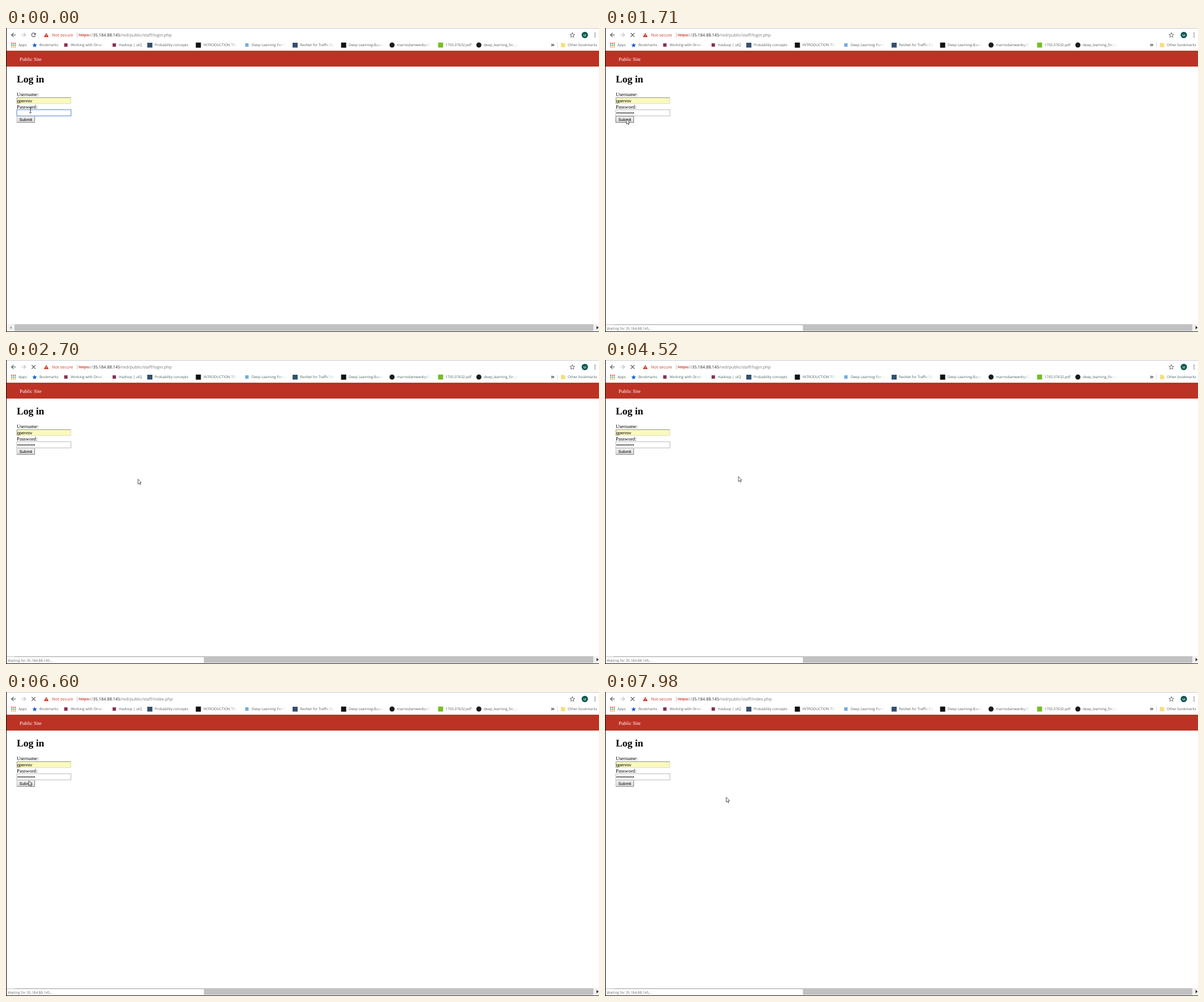
Recreate the animation shown at these times as an HTML page. Size 1045 px wide and 536 px high, loop 8000 ms.

```html
<!DOCTYPE html>
<html lang="en">
<head>
<meta charset="utf-8">
<title>Log in</title>
<style>
html, body { margin: 0; width: 100%; height: 100%; overflow: hidden; background: #fff; }
svg { display: block; width: 100vw; height: 100vh; }
text { text-rendering: geometricPrecision; white-space: pre; }
.ui { font-family: "Open Sans", "Noto Sans", sans-serif; }
.bar { font-size: 7.38px; }
.marks { font-size: 6.3px; fill: #55585c; }
.page { font: 8.9px "Liberation Serif", "Times New Roman", serif; }
.form { font: 7.26px "Liberation Sans", Arial, sans-serif; }
.line { fill: none; stroke: #4a4d51; stroke-width: 1.1; }

/* one shared 8 s clock, hard cuts only */
.t { animation: 8s step-end infinite; }
.typed { animation-name: typed; }
.focus { animation-name: focus; }
.blur, .stop { animation-name: blur; }
.reload { animation-name: focus; }
.hover { animation-name: hover; }
.status { animation-name: status; }
.host { animation-name: host; }
.cache { animation-name: cache; }
.login { animation-name: login; }
.index { animation-name: index; }
.beam { animation-name: beam; }
.arrow { animation-name: arrow; }

@keyframes typed { 0% { opacity: 0 } 7.375%, 100% { opacity: 1 } }
@keyframes focus { 0% { opacity: 1 } 16.25%, 100% { opacity: 0 } }
@keyframes blur { 0% { opacity: 0 } 16.25%, 100% { opacity: 1 } }
@keyframes hover { 0% { opacity: 0 } 12.875% { opacity: 1 } 32%, 100% { opacity: 0 } }
@keyframes status { 0% { opacity: 0 } 21.375%, 100% { opacity: 1 } }
@keyframes host { 0% { opacity: 1 } 73.875% { opacity: 0 } 77.25%, 100% { opacity: 1 } }
@keyframes cache { 0% { opacity: 0 } 73.875% { opacity: 1 } 77.25%, 100% { opacity: 0 } }
@keyframes login { 0% { opacity: 1 } 72.125%, 100% { opacity: 0 } }
@keyframes index { 0% { opacity: 0 } 72.125%, 100% { opacity: 1 } }
@keyframes beam {
  0% { transform: translate(43px, 145px); opacity: 1 }
  7.375% { transform: translate(43px, 148px); opacity: 1 }
  11%, 100% { transform: translate(43px, 148px); opacity: 0 }
}
@keyframes arrow {
  0% { transform: translate(37px, 162px); opacity: 0 }
  11% { transform: translate(37px, 162px); opacity: 1 }
  12.875% { transform: translate(36.5px, 161px) }
  14.625% { transform: translate(36.3px, 160.2px) }
  18% { transform: translate(36.6px, 160.2px) }
  19.5% { transform: translate(37px, 160.2px) }
  22.875% { transform: translate(37.5px, 159.7px) }
  30% { transform: translate(40.5px, 159.5px) }
  32% { transform: translate(192px, 205px) }
  33.75% { transform: translate(232px, 209.5px) }
  39.125% { transform: translate(233px, 208.5px) }
  41% { transform: translate(234px, 207px) }
  42.875% { transform: translate(234.3px, 206px) }
  53% { transform: translate(234.3px, 205.4px) }
  56.5% { transform: translate(234.5px, 205px) }
  73.875% { transform: translate(228px, 202px) }
  75.375% { transform: translate(200px, 197px) }
  77.25% { transform: translate(71px, 162px) }
  79.125% { transform: translate(40px, 157px) }
  82.5% { transform: translate(39.5px, 156px) }
  86% { transform: translate(40px, 156.4px) }
  87.875% { transform: translate(60px, 161px) }
  89.75% { transform: translate(165px, 182px) }
  91.25% { transform: translate(223px, 190px) }
  96.625% { transform: translate(219px, 192.5px) }
  98.25% { transform: translate(215px, 188px) }
  99.75%, 100% { transform: translate(213px, 185px); opacity: 1 }
}
</style>
</head>
<body>
<svg viewBox="0 0 1045 536" preserveAspectRatio="none">
  <defs>
    <linearGradient id="fadeOut">
      <stop offset="0" stop-color="#fff" stop-opacity="0"/>
      <stop offset=".62" stop-color="#fff"/>
    </linearGradient>
    <linearGradient id="face" x2="0" y2="1">
      <stop offset="0" stop-color="#f3f3f3"/>
      <stop offset="1" stop-color="#d9d9d9"/>
    </linearGradient>
    <rect id="fade" x="46" y="24" width="24" height="12" fill="url(#fadeOut)"/>
    <path id="star" d="M0-4.4 1.2-1.4 4.3-1.3 1.9.7 2.7 3.8 0 2.1-2.7 3.8-1.9.7-4.3-1.3-1.2-1.4Z"/>
  </defs>
  <rect width="1045" height="536" fill="#fff"/>

  <!-- address bar -->
  <g class="ui bar">
    <path class="line" d="M17.3 12.3H9.8M13.3 8.7 9.7 12.3 13.3 15.9"/>
    <path class="line" style="stroke:#babcbe" d="M27 12.3H34.5M31 8.7 34.6 12.3 31 15.9"/>
    <g class="t reload">
      <path class="line" d="M51.3 10A3.4 3.4 0 1 0 51.9 13.2"/>
      <path d="M52.5 8.4V12H48.9Z" fill="#4a4d51"/>
    </g>
    <path class="line t stop" d="M45.3 8.9 52 15.6M52 8.9 45.3 15.6"/>
    <path d="M71 8.4 75.2 16H66.8Z" fill="#d5301f"/>
    <path d="M71 11V13.4M71 14.1V15" stroke="#fff" stroke-width=".9"/>
    <text x="81" y="15" fill="#d0402f">Not secure</text>
    <path d="M125.5 8V17" stroke="#aaa" stroke-width=".7"/>
    <text x="128" y="15" fill="#d0402f">https<tspan fill="#777">://</tspan><tspan fill="#2b2b2b">35.184.88.145</tspan></text>
    <path d="M128 12.7H147.5" stroke="#d0402f" stroke-width=".7"/>
    <g fill="#777">
      <text class="t login" x="201.3" y="15">/red/public/staff/login.php</text>
      <text class="t index" x="201.3" y="15">/red/public/staff/index.php</text>
    </g>
    <use href="#star" x="998" y="12.5" fill="none" stroke="#4a4d51" stroke-width=".8"/>
    <circle cx="1020" cy="12.3" r="5.6" fill="#0b584c"/>
    <text x="1020" y="14.5" font-size="6" fill="#fff" text-anchor="middle">M</text>
    <path d="M1038 9.2V15.8" stroke="#4a4d51" stroke-width="1.7" stroke-linecap="round" stroke-dasharray="0 3.2"/>
  </g>

  <!-- bookmarks -->
  <g class="ui marks">
    <g stroke-width="2" stroke-dasharray="2 1.2">
      <path d="M9 27H17.4" stroke="#df5145"/>
      <path d="M9 30.2H17.4" stroke="#3f9b5c"/>
      <path d="M9 33.4H17.4" stroke="#e6ae32"/>
    </g>
    <text x="22" y="32.3">Apps</text>
    <use href="#star" x="50.5" y="30.3" fill="#1d5fd0"/>
    <text x="59" y="32.3">Bookmarks</text>
    <rect x="102.5" y="27" width="6" height="6" fill="#8c2f58"/>
    <text x="114" y="32.3">Working with Orvel |</text>
    <rect x="187.8" y="27" width="6" height="6" fill="#8c2f58"/>
    <text x="199" y="32.3">Hadoop | ulQ</text>
    <rect x="249" y="26" width="9" height="8.5" fill="#34506f"/>
    <text x="262" y="32.3">Probability concepts</text>
    <rect x="334.5" y="25.7" width="9" height="9" fill="#111"/>
    <text x="348" y="32.3">INTRODUCTION TO C</text>
    <rect x="421.5" y="27" width="6" height="6" fill="#78a9dc"/>
    <text x="433" y="32.3">Deep Learning For Co</text>
    <rect x="505" y="26" width="9" height="8.5" fill="#34506f"/>
    <text x="518" y="32.3">ResNet for Traffic Sign</text>
    <rect x="590.5" y="25.7" width="9" height="9" fill="#111"/>
    <text x="604" y="32.3">Deep Learning-Based</text>
    <circle cx="680.3" cy="30" r="4.5" fill="#1b1b1b"/>
    <text x="689" y="32.3">marnodamwenby/Cal</text>
    <rect x="761.5" y="25.7" width="8.8" height="8.8" fill="#76bd22"/>
    <text x="774.5" y="32.3">1705.07632.pdf</text>
    <circle cx="833.3" cy="30" r="4.5" fill="#1b1b1b"/>
    <text x="842" y="32.3">deep_learning_for_ca</text>
    <use href="#fade" x="114"/><use href="#fade" x="348"/><use href="#fade" x="433"/>
    <use href="#fade" x="518"/><use href="#fade" x="604"/><use href="#fade" x="689"/>
    <use href="#fade" x="842"/>
    <path class="line" stroke-width=".9" d="M961 28 963 30 961 32M963.6 28 965.6 30 963.6 32"/>
    <path d="M971.5 25V35" stroke="#ccc" stroke-width=".6"/>
    <path d="M978 26H981.5L982.3 27H985.5V34H978Z" fill="#f9dc7e"/>
    <text x="990" y="32.3">Other bookmarks</text>
  </g>

  <!-- page -->
  <rect y="40" width="1045" height="28" fill="#bc3224"/>
  <g class="page">
    <text x="24" y="57.5" fill="#fff">Public Site</text>
    <text x="19" y="96" font-size="17.6" font-weight="bold">Log in</text>
    <text x="19" y="120">Username:</text>
    <text x="19" y="141.7">Password:</text>
  </g>
  <g class="form">
    <rect x="19" y="122.5" width="95.5" height="11" fill="#fafabd"/>
    <path d="M19.3 133.5V122.8H114.5" fill="none" stroke="#858585" stroke-width=".9"/>
    <path d="M114.2 123V133.2H19.5" fill="none" stroke="#d2d2c4" stroke-width=".7"/>
    <text x="20" y="130.5">gpenrov</text>
    <rect class="t focus" x="19" y="144" width="95.6" height="11" fill="#fff" stroke="#4a80d0"/>
    <rect class="t blur" x="19" y="144" width="95.4" height="11" fill="#fff" stroke="#b0b0b0" stroke-width=".9"/>
    <path class="t typed" d="M21.3 149.8H50.5" stroke="#000" stroke-width="1.9" stroke-linecap="round" stroke-dasharray="0 2.62"/>
    <rect x="19" y="155.8" width="31.6" height="10.8" fill="url(#face)" stroke="#b4b4b4" stroke-width=".7"/>
    <path d="M50.6 156V166.6H19" fill="none" stroke="#777" stroke-width=".8"/>
    <rect class="t hover" x="19" y="155.8" width="31.6" height="10.8" fill="none" stroke="#7c7c7c" stroke-width=".8"/>
    <text x="34.8" y="163.7" text-anchor="middle">Submit</text>
  </g>

  <!-- scrollbar and status bubble -->
  <rect y="522" width="1045" height="13" fill="#f1f1f1"/>
  <rect x="15" y="522.3" width="1020" height="11.9" fill="#c1c1c1"/>
  <path d="M10 525.5V531L6.8 528.2Z" fill="#a0a0a0"/>
  <path d="M1040.7 525.3V531.2L1044.2 528.2Z" fill="#222"/>
  <g class="ui t status" font-size="6.22" fill="#6a6a6a">
    <path d="M0 523.4H347Q349.2 523.4 349.2 525.6V535H0Z" fill="#fff" stroke="#b5b5b5" stroke-width=".7"/>
    <text x="3" y="532">Waiting for </text>
    <text class="t host" x="36.5" y="532">35.184.88.145...</text>
    <text class="t cache" x="36.5" y="532">cache...</text>
  </g>

  <!-- window edges -->
  <rect width="1045" height="1" fill="#c6cbd1"/>
  <rect y="535" width="1045" height="1" fill="#2a2a2a"/>
  <rect width="1.1" height="536" fill="#111"/>

  <!-- pointers -->
  <path class="t beam" d="M-2-4.6H-.6L0-4 .6-4.6H2M0-4V4M-2 4.6H-.6L0 4 .6 4.6H2" fill="none" stroke="#222" stroke-width=".9"/>
  <path class="t arrow" d="M.6.6V9.2L2.6 7.4 4 10.4 5.3 9.8 4 6.9H6.7Z" fill="#fff" stroke="#222" stroke-width=".75"/>
</svg>
</body>
</html>
```
